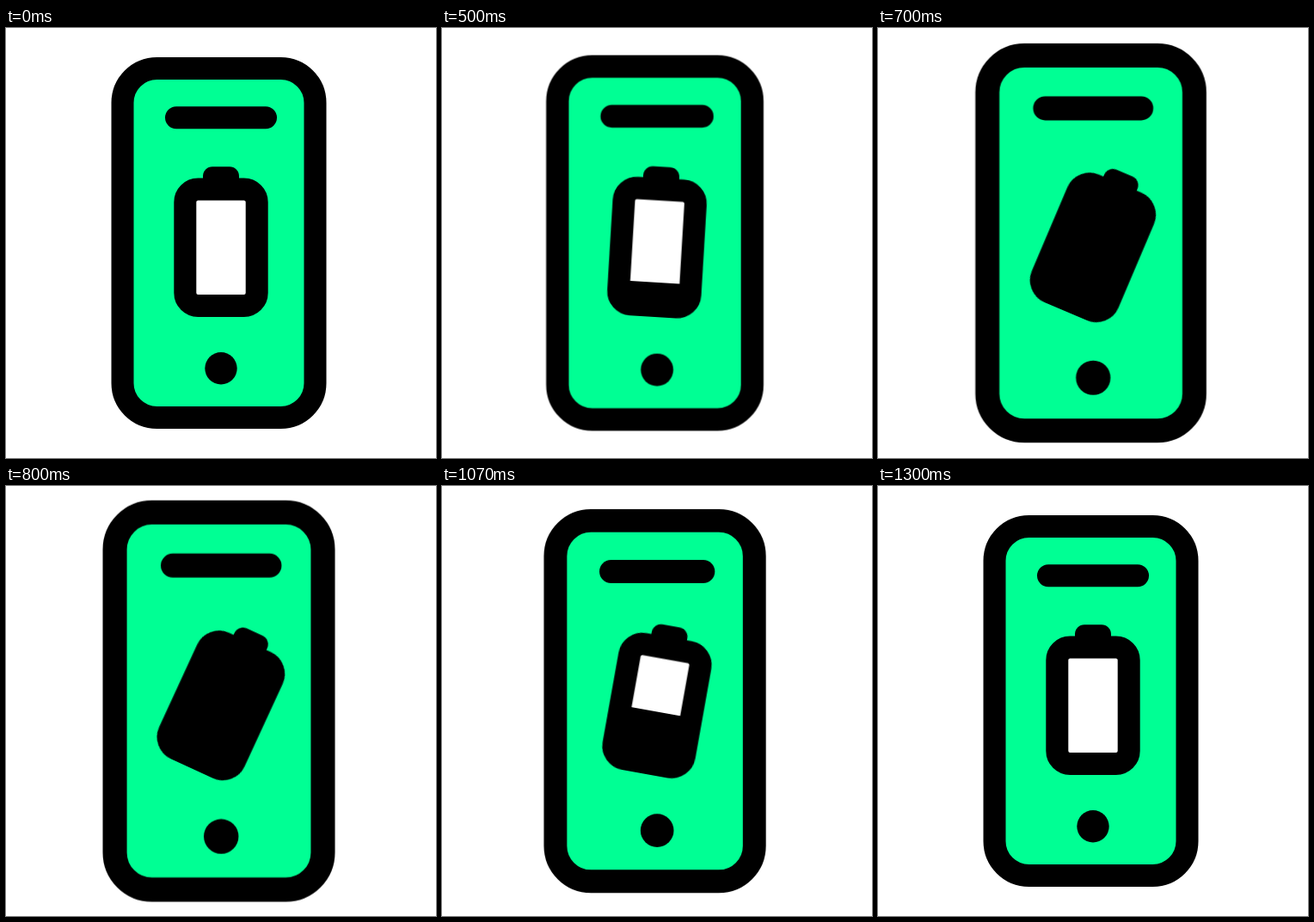
Recreate the animation shown at these times as an HTML page. Size 500x500 px, loop 1430 ms.

```html
<!DOCTYPE html>
<html lang="en">
<head>
<meta charset="utf-8">
<title>Phone charging</title>
<style>
  html, body { margin: 0; width: 100%; height: 100%; overflow: hidden; background: #fff; }
  svg { display: block; width: 100%; height: 100%; }

  .line { stroke: #000; stroke-width: 26; stroke-linecap: round; }

  /* One shared timing: rest, charge, return, rest */
  .phone, .battery, .charge {
    animation: 1430ms cubic-bezier(.65, 0, .19, 1) infinite;
  }
  .phone   { animation-name: grow; transform-origin: 247.5px 250px; }
  .battery { animation-name: tilt; transform-origin: 250px 255px; }
  .charge  { animation-name: fill; transform-origin: 250px 313px; }

  @keyframes grow {
    0%, 23.776%, 90.909%, 100% { transform: scale(1); }
    60.839% { transform: scale(1.081); }
  }
  @keyframes tilt {
    0%, 23.776%, 90.909%, 100% { transform: rotate(0deg); }
    60.839% { transform: rotate(25deg); }
  }
  @keyframes fill {
    0%, 23.776%, 90.909%, 100% { transform: scaleY(0); }
    60.839% { transform: scaleY(1); }
  }
</style>
</head>
<body>
<svg viewBox="0 0 500 500">
  <g class="phone">
    <rect class="line" x="135.5" y="47" width="224" height="406" rx="40" fill="#00ff94"/>
    <path class="line" d="M198 104.2H302"/>
    <circle cx="250" cy="395.8" r="18.7"/>
  </g>
  <g class="battery">
    <rect x="229" y="161.3" width="42" height="25" rx="11"/>
    <rect class="line" x="208.3" y="187.5" width="83.4" height="135.5" rx="15" fill="#fff"/>
    <rect class="charge" x="209" y="188" width="82" height="125"/>
  </g>
</svg>
</body>
</html>
```
